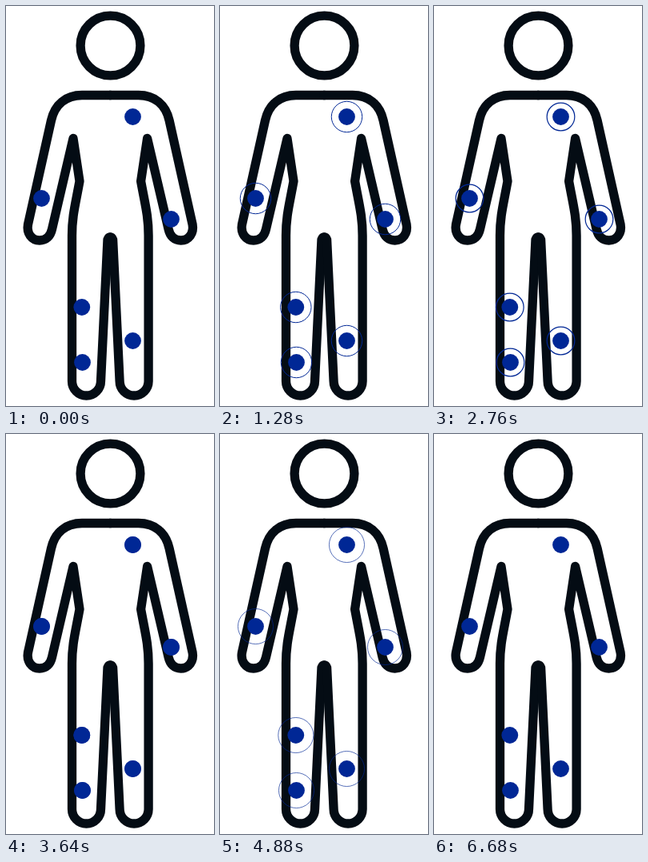
An HTML page for the animation above (7 s loop, 260 by 500 pixels).

```html
<!DOCTYPE html>
<html lang="en">
<head>
<meta charset="utf-8">
<title>Body points</title>
<style>
  html, body { margin: 0; width: 100%; height: 100%; overflow: hidden; background: #fff; }
  svg { display: block; width: 260px; height: 500px; }
  .body { fill: none; stroke: #040c14; stroke-width: 11.3; stroke-linejoin: round; stroke-linecap: round; }
  .dot { fill: #002795; }
  .ring { fill: none; stroke: #002795; }
</style>
</head>
<body>
<svg viewBox="0 0 260 500">
  <defs>
    <path id="half" d="M131 111.5 H95 C75 111.5 61 123 56.5 143 L27.5 273
      C25.5 284 32 293 42 293 C50 293 55.5 288 57.5 279 L84 165.5 L92 219
      C87 247 82.5 262 82.5 287 V469 A18 18 0 0 0 118.5 469
      L127 292 Q128 288.8 130.3 288.8"/>
  </defs>
  <g class="body">
    <circle cx="130.5" cy="49.5" r="37.4"/>
    <use href="#half"/>
    <use href="#half" transform="matrix(-1 0 0 1 260.6 0)"/>
  </g>
  <g id="points"></g>
</svg>
<script>
  const LOOP = 7000, PULSE = 1380;
  const STARTS = [300, 1965, 3625, 5278];
  const POINTS = [[158.5, 138.5], [44.5, 240.5], [206.5, 266.5],
                  [94.8, 376.5], [158.5, 418.5], [95.5, 445.5]];
  const layer = document.getElementById('points');

  function circle(cls, [x, y], r) {
    const el = document.createElementNS('http://www.w3.org/2000/svg', 'circle');
    el.setAttribute('class', cls);
    el.setAttribute('cx', x);
    el.setAttribute('cy', y);
    el.setAttribute('r', r);
    return layer.appendChild(el);
  }

  const rings = POINTS.map(p => circle('ring', p, 9));
  POINTS.forEach(p => circle('dot', p, 10.4));

  function draw() {
    const t = performance.now() % LOOP;
    const start = STARTS.find(s => t >= s && t < s + PULSE);
    const p = start === undefined ? 1 : (t - start) / PULSE;
    for (const ring of rings) {
      ring.setAttribute('r', 9.2 + 14.1 * p);
      ring.setAttribute('stroke-width', 2.2 - 1.7 * p);
      ring.setAttribute('visibility', p < 1 ? 'visible' : 'hidden');
    }
    requestAnimationFrame(draw);
  }
  draw();
</script>
</body>
</html>
```
